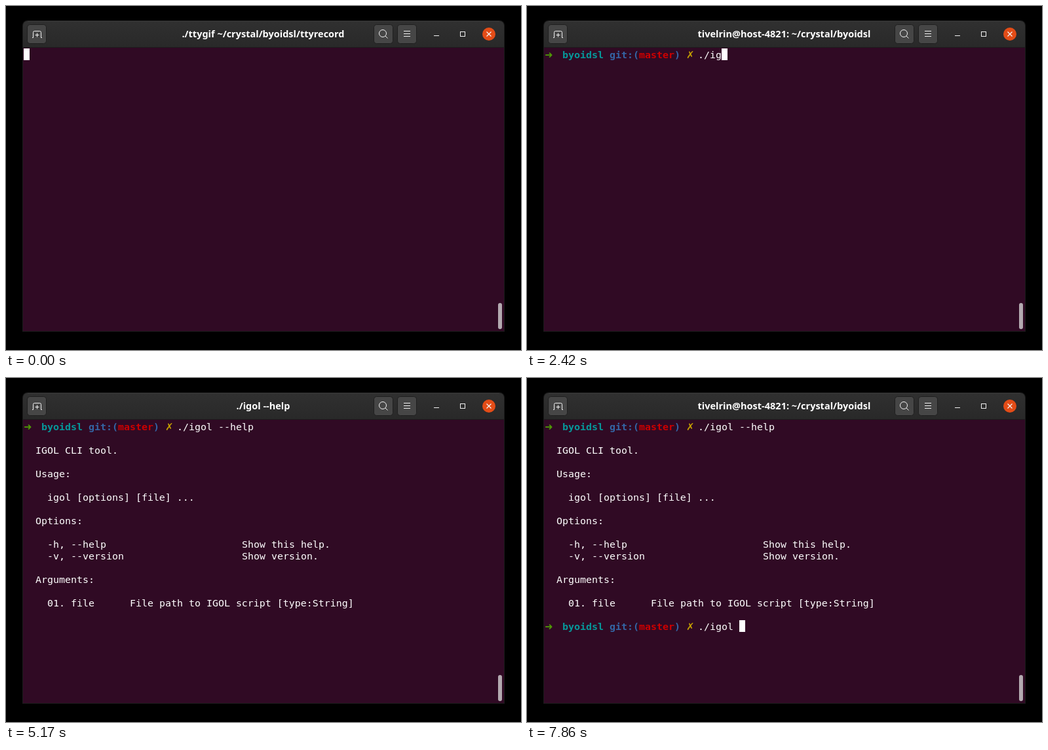
Write an HTML page that moves like this. It is 786 px wide and 527 px high and loops after 8 s.

```html
<!DOCTYPE html>
<html lang="en">
<head>
<meta charset="utf-8">
<title>Terminal session</title>
<style>
  html, body { margin: 0; width: 100%; height: 100%; overflow: hidden; background: #000; }
  svg { display: block; }
  text { white-space: pre; font: 14.95px "DejaVu Sans Mono", monospace; fill: #fff; }
  .bold { font-weight: bold; }
  .symbol { font-family: "DejaVu Sans", sans-serif; font-size: 15px; }
  #title { font: bold 14.5px "Noto Sans", sans-serif; text-anchor: middle; }
  .button { fill: #464646; stroke: #1f1f1f; }
  .icon { fill: none; stroke: #f2f2f2; }
</style>
</head>
<body>
<svg width="786" height="527" viewBox="0 0 786 527">
  <defs>
    <linearGradient id="bar" x2="0" y2="1">
      <stop stop-color="#303030"/>
      <stop offset="1" stop-color="#292929"/>
    </linearGradient>
  </defs>

  <path d="M25 499V30a8 8 0 0 1 8-8H753a8 8 0 0 1 8 8V499Z" fill="#1c1c1c"/>
  <path d="M26 63V30a7 7 0 0 1 7-7H753a7 7 0 0 1 7 7V63Z" fill="url(#bar)"/>
  <path d="M33 23.5H753" stroke="#3b3b3b"/>
  <rect x="26" y="64" width="734" height="434" fill="#300a24"/>

  <g class="button">
    <rect x="32.5" y="28.5" width="29" height="29" rx="4"/>
    <rect x="561.5" y="28.5" width="29" height="29" rx="4"/>
    <rect x="597.5" y="28.5" width="29" height="29" rx="4"/>
  </g>
  <g class="icon">
    <path d="M40 48.5h1.5v-8q0-2 2-2h8q2 0 2 2v8H55M47.5 41.5v6M44.500 44.500h6"/>
    <circle cx="575" cy="42" r="5.5"/>
    <path d="M579 46l3.500 3.500"/>
    <path d="M607 38.500h10M607 42.500h10M607 46.500h10"/>
    <path d="M653 45.500h8"/>
    <rect x="693.5" y="39.5" width="7" height="7"/>
  </g>
  <circle cx="737" cy="43" r="10" fill="#e34c17"/>
  <path class="icon" d="M733.500 39.500l7 7m0-7l-7 7" stroke-width="1.3"/>

  <text id="title" x="392.500" y="48"></text>
  <g id="screen"></g>
  <rect id="cursor" width="9" height="18" fill="#fff"/>
  <rect x="751" y="455" width="6" height="40" rx="3" fill="#b3aab0"/>
</svg>

<script>
const DURATION = 8000;
const CELL = { w: 9, h: 18, left: 27, top: 65, baseline: 15 };
const PROMPT_COL = 26;

const screen = document.getElementById("screen");
const title = document.getElementById("title");
const cursor = document.getElementById("cursor");

const colX = col => CELL.left + col * CELL.w;
const rowY = row => CELL.top + row * CELL.h;

function addText(parent, row, col, content, color = "#fff", className = "") {
  const node = document.createElementNS("http://www.w3.org/2000/svg", "text");
  node.setAttribute("x", colX(col));
  node.setAttribute("y", rowY(row) + CELL.baseline);
  node.setAttribute("class", className);
  node.style.fill = color;
  node.textContent = content;
  parent.append(node);
  return node;
}

function addGroup() {
  const group = document.createElementNS("http://www.w3.org/2000/svg", "g");
  screen.append(group);
  return group;
}

function addPrompt(row, start, command, keyTimes) {
  const group = addGroup();
  addText(group, row, 0, "➜", "#4e9a06", "bold symbol");
  addText(group, row, 3, "byoidsl", "#06989a", "bold");
  addText(group, row, 11, "git:(", "#3465a4", "bold");
  addText(group, row, 16, "master", "#cc0000", "bold");
  addText(group, row, 22, ")", "#3465a4", "bold");
  addText(group, row, 24, "✗", "#c4a000", "bold symbol");
  const input = addText(group, row, PROMPT_COL, "");
  return { group, row, start, command, keyTimes, input };
}

const prompts = [
  addPrompt(0, 100, "./igol --help",
    [1610, 1710, 2300, 2420, 2550, 2730, 2950, 3830, 4000, 4220, 4430, 4510, 4800]),
  addPrompt(17, 5370, "./igol ", [6530, 6590, 7030, 7190, 7320, 7530, 7860]),
];

const help = addGroup();
[
  [2, 2, "IGOL CLI tool."],
  [4, 2, "Usage:"],
  [6, 4, "igol [options] [file] ..."],
  [8, 2, "Options:"],
  [10, 4, "-h, --help"], [10, 37, "Show this help."],
  [11, 4, "-v, --version"], [11, 37, "Show version."],
  [13, 2, "Arguments:"],
  [15, 4, "01. file"], [15, 18, "File path to IGOL script [type:String]"],
].forEach(([row, col, content]) => addText(help, row, col, content));

const SHELL_TITLE = "tivelrin@host-4821: ~/crystal/byoidsl";
const titles = [
  [0, "./ttygif ~/crystal/byoidsl/ttyrecord"],
  [100, SHELL_TITLE],
  [5170, "./igol --help"],
  [5370, SHELL_TITLE],
];

const show = (node, visible) => node.setAttribute("visibility", visible ? "visible" : "hidden");

function render(t) {
  title.textContent = titles.findLast(([start]) => t >= start)[1];
  show(help, t >= 5170);

  let cursorRow = 0, cursorCol = 0;
  for (const { group, row, start, command, keyTimes, input } of prompts) {
    const typed = keyTimes.filter(time => t >= time).length;
    input.textContent = command.slice(0, typed);
    show(group, t >= start);
    if (t >= start) {
      cursorRow = row;
      cursorCol = PROMPT_COL + typed;
    }
  }
  cursor.setAttribute("x", colX(cursorCol));
  cursor.setAttribute("y", rowY(cursorRow));
  show(cursor, t < 2950 || t >= 5370);
}

const origin = performance.now();
function frame() {
  render((performance.now() - origin) % DURATION);
  requestAnimationFrame(frame);
}
frame();
</script>
</body>
</html>
```
